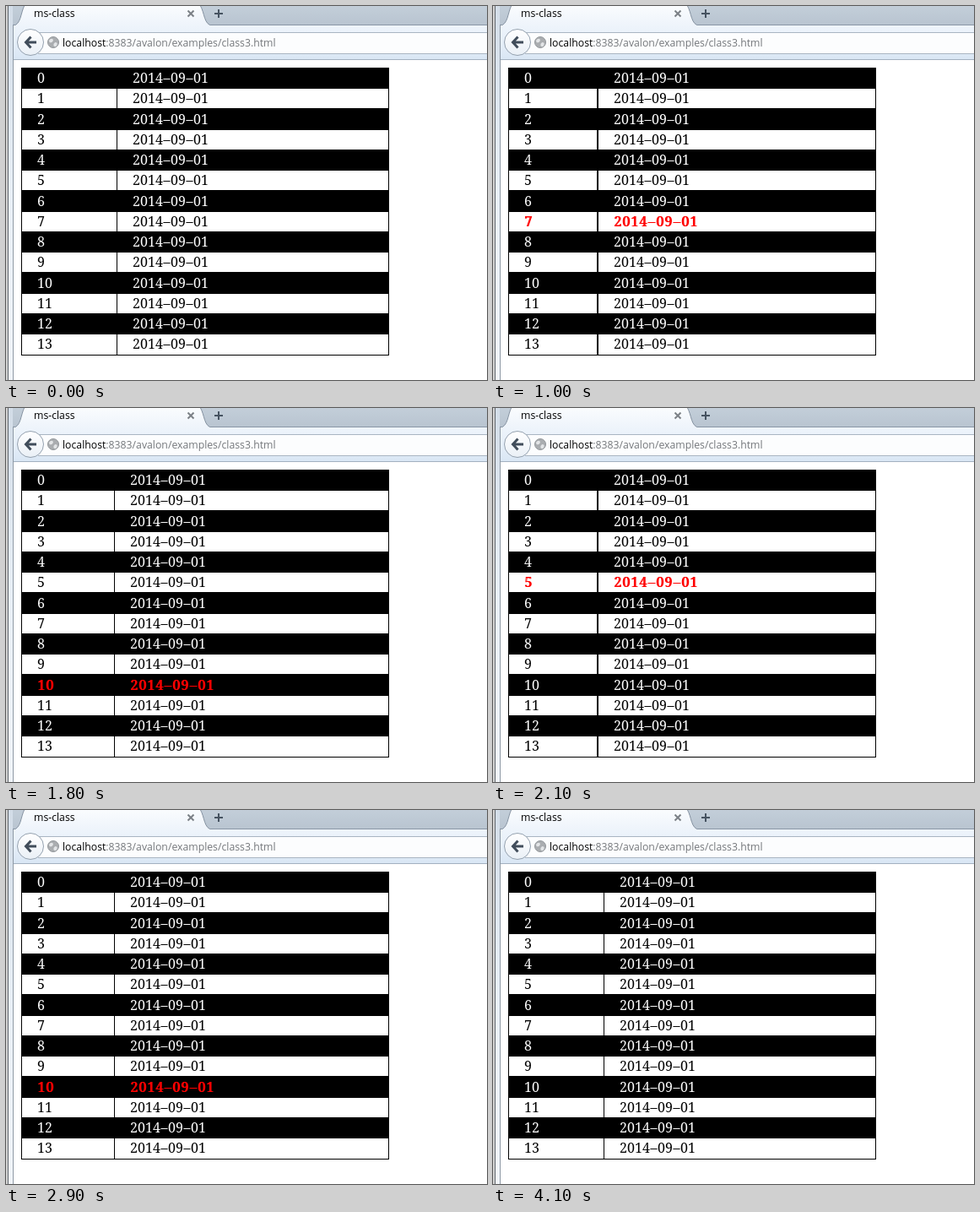
Recreate the animation shown at these times as an HTML page with a canvas. Size 570 by 443 pixels, loop 4.8 s.

```html
<!DOCTYPE html>
<html lang="en">
<head>
<meta charset="utf-8">
<title>ms-class</title>
<style>
html, body { margin: 0; width: 100%; height: 100%; overflow: hidden; background: #fff; }
canvas { display: block; }
</style>
</head>
<body>
<canvas id="stage" width="570" height="443"></canvas>
<script>
const ctx = document.getElementById('stage').getContext('2d');
const LOOP = 4800, STEP = 100, ENTER = 300, LEAVE = 4100;
const ROWS = 14, TOP = 72.75, PITCH = 24.27, LEFT = 18, RIGHT = 454;
const UI_FONT = '12.25px "Open Sans", "Noto Sans", sans-serif';
const CELL_FONT = '16px "Noto Serif", "Liberation Serif", serif';

// Pointer strokes: rows crossed per step, for a number of steps, then rest
const STROKES = [
  { at: ENTER, row: 0, speed: 0.5, steps: 2 },
  { at: 700, row: 3, speed: 1.34, steps: 8 },
  { at: 1800, row: 10, speed: -1.5, steps: 4 },
  { at: 2500, row: 3, speed: 1.8, steps: 5 },
  { at: 3300, row: 13, speed: 0, steps: 0 },
  { at: 3600, row: 12, speed: -2.75, steps: 4 }
];

function hoverAt(t) {
  if (t < ENTER || t >= LEAVE) return -1;
  const { at, row, speed, steps } = STROKES.findLast(s => t >= s.at);
  const k = Math.min(steps, Math.floor((t - at) / STEP));
  return Math.floor(row + speed * k);
}

function rect(x, y, w, h, fill) {
  ctx.fillStyle = fill;
  ctx.fillRect(x, y, w, h);
}

function text(str, x, y, fill, font) {
  ctx.font = font;
  ctx.fillStyle = fill;
  ctx.fillText(str, x, y);
}

function shade(y0, y1, ...colors) {
  const g = ctx.createLinearGradient(0, y0, 0, y1);
  colors.forEach((c, i) => g.addColorStop(i / (colors.length - 1), c));
  return g;
}

function lines(color, width, ...paths) {
  ctx.strokeStyle = color;
  ctx.lineWidth = width;
  ctx.beginPath();
  for (const [start, ...rest] of paths) {
    ctx.moveTo(...start);
    for (const p of rest) ctx.lineTo(...p);
  }
  ctx.stroke();
}

function disc(x, y, r, fill, stroke) {
  ctx.beginPath();
  ctx.arc(x, y, r, 0, Math.PI * 2);
  ctx.fillStyle = fill;
  ctx.fill();
  ctx.strokeStyle = stroke;
  ctx.lineWidth = 1;
  ctx.stroke();
}

function drawTabs() {
  rect(0, 0, 570, 23, shade(0, 23, '#c3ced9', '#b8c4d0'));
  rect(8, 22, 562, 1, '#8996a5');
  ctx.beginPath();
  ctx.moveTo(8, 23.5);
  ctx.bezierCurveTo(18, 22, 17, 9, 22, -1);
  ctx.lineTo(230, -1);
  ctx.bezierCurveTo(236, 9, 234, 22, 245, 23.5);
  ctx.fillStyle = shade(0, 23, '#fafcfe', '#eef4fb');
  ctx.fill();
  ctx.strokeStyle = '#8592a1';
  ctx.lineWidth = 1;
  ctx.stroke();
  text('ms-class', 33, 13, '#000', UI_FONT);
  lines('#7b8086', 2, [[215.5, 5.5], [222.5, 12.5]], [[222.5, 5.5], [215.5, 12.5]]);
  lines('#465361', 2, [[247, 9], [257, 9]], [[252, 4], [252, 14]]);
}

function drawGlobe() {
  disc(56, 43, 6.5, '#aaadb0', '#94989c');
  ctx.fillStyle = '#e3e5e7';
  ctx.beginPath();
  ctx.ellipse(53.5, 41, 2.6, 2, -0.6, 0, Math.PI * 2);
  ctx.ellipse(58.5, 45.5, 2, 2.6, 0.5, 0, Math.PI * 2);
  ctx.fill();
}

function drawToolbar() {
  rect(8, 23, 562, 40, shade(23, 63, '#eef4fb', '#e6eff9', '#d9e6f4'));
  rect(8, 63, 562, 1, '#a3b1c0');
  rect(38, 31, 532, 26, '#a9b5c2');
  rect(38, 32, 532, 24, '#fcfdfe');
  disc(29, 43, 15.5, shade(28, 59, '#fff', '#e9eff6'), '#94a1af');
  lines('#414d5b', 3, [[29.5, 36.5], [23.5, 43], [29.5, 49.5]], [[24, 43], [36, 43]]);
  drawGlobe();
  const host = 'localhost';
  text(host, 67, 48, '#000', UI_FONT);
  text(':8383/avalon/examples/class3.html', 67 + ctx.measureText(host).width, 48, '#74777b', UI_FONT);
}

function drawFrame() {
  rect(0, 0, 8, 443, shade(0, 443, '#d3dde8', '#e9f0f7', '#f1f5f9'));
  rect(0, 0, 2, 443, '#d2d2d2');
  rect(2, 0, 1, 443, '#62676d');
  rect(8, 23, 1, 420, '#8e99a5');
}

// Fixed-pitch text; bold is a second pass one pixel to the right.
function cellText(str, x, y, color, bold) {
  const advance = bold ? 10 : 9;
  ctx.textAlign = 'center';
  [...str.replace(/-/g, '\u2013')].forEach((c, i) => {
    const cx = x + 4.5 + i * advance;
    text(c, cx, y, color, CELL_FONT);
    if (bold) text(c, cx + 1, y, color, CELL_FONT);
  });
  ctx.textAlign = 'left';
}

const rowEdge = i => Math.round(TOP + i * PITCH);

// The bold row changes the automatic column widths.
function layout(hover) {
  if (hover < 0) return { line: 131, width: 1, date: 150 };
  if (hover < 10) return { line: 123, width: 2, date: 143 };
  return { line: 128, width: 1, date: 147 };
}

function drawTable(hover) {
  const col = layout(hover);
  rect(LEFT, rowEdge(0), RIGHT - LEFT, rowEdge(ROWS) + 1 - rowEdge(0), '#000');
  for (let i = 0; i < ROWS; i++) {
    const odd = i % 2 === 1, bold = i === hover;
    if (odd) {
      const y = rowEdge(i) + 1, h = rowEdge(i + 1) - y;
      const x = col.line + col.width;
      rect(LEFT + 1, y, col.line - LEFT - 1, h, '#fff');
      rect(x, y, RIGHT - 1 - x, h, '#fff');
    }
    const color = bold ? '#f00' : odd ? '#000' : '#fff';
    const base = Math.ceil(TOP + 18 + i * 24.25);
    cellText(String(i), 37, base, color, bold);
    cellText('2014-09-01', col.date, base, color, bold);
  }
}

let origin;
function tick(now) {
  origin ??= now;
  rect(0, 0, 570, 443, '#fff');
  drawTabs();
  drawToolbar();
  drawFrame();
  drawTable(hoverAt((now - origin) % LOOP));
  requestAnimationFrame(tick);
}
requestAnimationFrame(tick);
</script>
</body>
</html>
```
